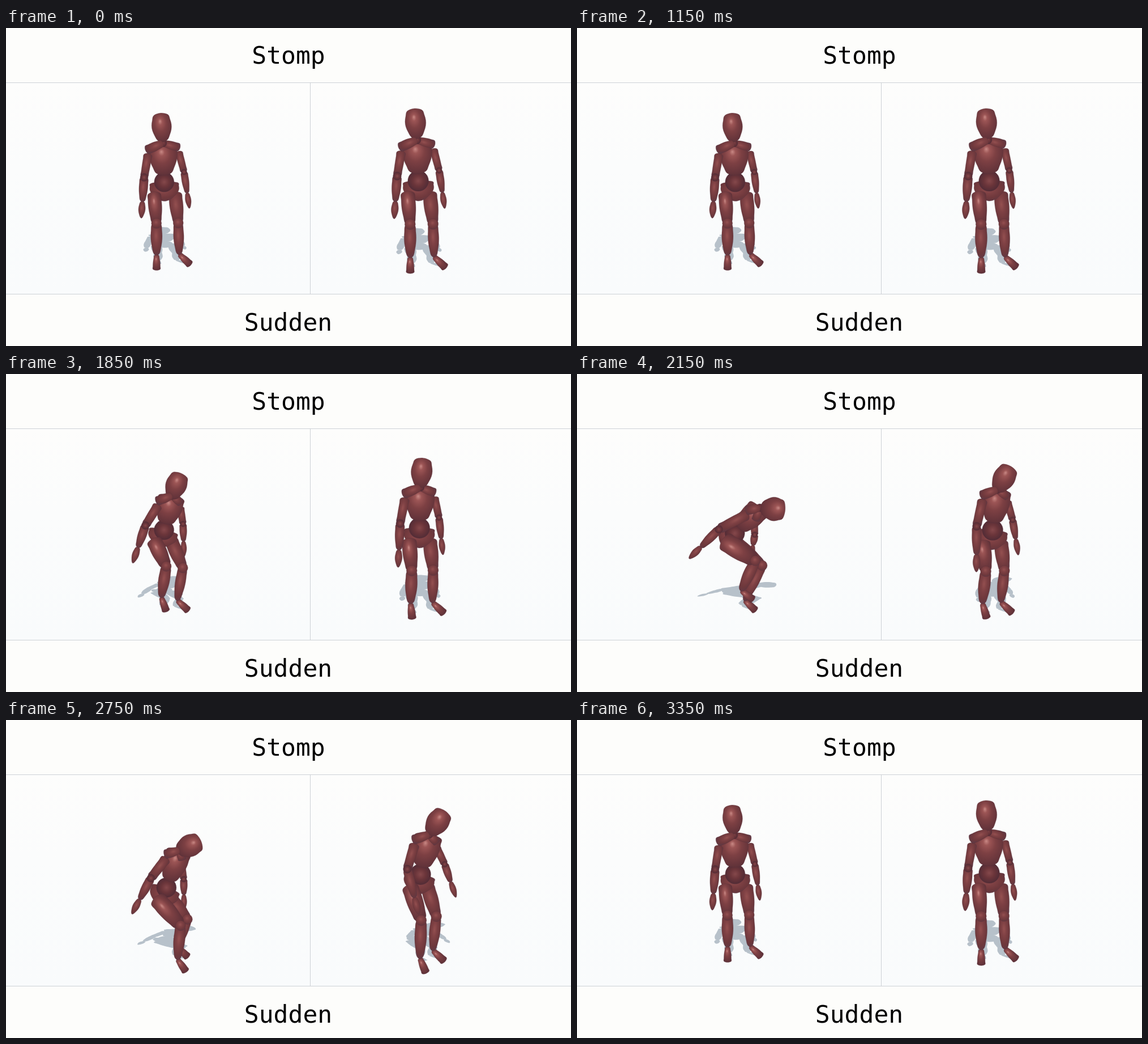
These frames come from a looping animation (998 px wide and 561 px high, 3400 ms). An HTML page:

```html
<!DOCTYPE html>
<html lang="en">
<head>
<meta charset="utf-8">
<title>Stomp, sudden</title>
<style>
html, body { margin: 0; width: 100%; height: 100%; overflow: hidden; background: #fdfdfb; }
svg { display: block; width: 100vw; height: 100vh; }
text { font: 43px "DejaVu Sans Mono", monospace; text-anchor: middle; fill: #000; }
.part { stroke: #56303a; stroke-width: .5; stroke-opacity: .6; vector-effect: non-scaling-stroke; }
</style>
</head>
<body>
<svg id="stage" viewBox="0 0 998 561">
  <defs>
    <linearGradient id="floor" x1="0" y1="0" x2="0" y2="1">
      <stop offset="0" stop-color="#fdfdfc"/>
      <stop offset=".4" stop-color="#fbfcfc"/>
      <stop offset="1" stop-color="#f9fbfc"/>
    </linearGradient>
    <radialGradient id="skin" cx=".4" cy=".54" r=".62">
      <stop offset="0" stop-color="#945050"/>
      <stop offset=".35" stop-color="#7f4144"/>
      <stop offset=".75" stop-color="#6e383c"/>
      <stop offset="1" stop-color="#623842"/>
    </radialGradient>
    <radialGradient id="gloss" cx=".4" cy=".54" r=".6" fx=".28" fy=".56">
      <stop offset="0" stop-color="#c98985"/>
      <stop offset=".18" stop-color="#9c5555"/>
      <stop offset=".5" stop-color="#7d4043"/>
      <stop offset="1" stop-color="#603239"/>
    </radialGradient>
    <radialGradient id="shade" cx=".5" cy=".5" r=".55">
      <stop offset="0" stop-color="#85484b"/>
      <stop offset=".45" stop-color="#6b353a"/>
      <stop offset="1" stop-color="#4d2a35"/>
    </radialGradient>
  </defs>
  <rect width="998" height="561" fill="#fdfdfb"/>
  <rect y="96" width="998" height="374" fill="url(#floor)"/>
  <path d="M0 96.5H998M0 469.5H998M537.5 96V470" stroke="#cdd1d6" fill="none"/>
  <text x="499" y="63">Stomp</text>
  <text x="498.5" y="534">Sudden</text>
</svg>
<script>
const stage = document.getElementById('stage');
const LOOP = 3400, STEP = 50;

// Key points; elbows, knees, shoulders and hips follow from them.
const stand = {
  head: [275, 175.5], neck: [277, 203], hip: [280, 290],
  handL: [241, 306], handR: [320, 291], footL: [266, 400], footR: [306, 399],
  elbow: [-2], knee: [2], turn: [0]
};
const crouch = {
  head: [346, 238], neck: [323, 236], hip: [267, 293],
  handL: [219, 305], handR: [311, 302], footL: [290, 382], footR: [296, 399],
  elbow: [-10], knee: [41], turn: [1]
};
const landed = {
  head: [345.5, 244], neck: [320, 242], hip: [276, 324],
  handL: [234, 321], handR: [318, 316], footL: [320, 432], footR: [300, 400],
  elbow: [-5], knee: [35], turn: [.95]
};
const lean = {
  head: [303.5, 191], neck: [293, 209], hip: [283, 295],
  handL: [258, 318], handR: [324, 292], footL: [268, 400], footR: [299, 398],
  elbow: [-5], knee: [6], turn: [.3]
};
const lunge = {
  head: [328, 193], neck: [307, 209], hip: [279, 293],
  handL: [288, 316], handR: [347, 285], footL: [290, 422], footR: [303, 403],
  elbow: [-17], knee: [15], turn: [.6]
};

const mix = (a, b, k) => a + (b - a) * k;
const mixPt = (a, b, k) => a.map((v, i) => mix(v, b[i], k));
const move = ([x, y], dx, dy) => [x + dx, y + dy];

// far arm drifts in behind the body
const idle = drift => ({ ...stand, handR: move(stand.handR, -drift, 0) });

const timeline = (windup, land) => [
  [0, stand], [750, stand], [1500, idle(5)], [1650, idle(5)],
  [2150, windup], [2500, land], [2600, land],
  [3000, idle(14)], [3050, idle(14)], [LOOP, stand]
];

function poseAt(keys, t) {
  const i = keys.findIndex(k => k[0] > t);
  const [t0, a] = keys[i - 1], [t1, b] = keys[i];
  const k = (t - t0) / (t1 - t0), ease = k * k * (3 - 2 * k);
  return Object.fromEntries(Object.keys(a).map(n => [n, mixPt(a[n], b[n], ease)]));
}

// point beyond b on the line from a
function extend(a, b, len) {
  const k = len / Math.hypot(b[0] - a[0], b[1] - a[1]);
  return move(b, (b[0] - a[0]) * k, (b[1] - a[1]) * k);
}

function bend(a, b, dx) {
  return move(mixPt(a, b, .5), dx, -Math.abs(dx) * .2);
}

function solve(p) {
  const turn = p.turn[0], spread = 18.5 * (1 - turn / 2);
  const headLen = 24.5 - 3.5 * turn, swing = turn * .9;
  const j = {
    neck: p.neck, wrL: p.handL, wrR: p.handR, anL: p.footL, anR: p.footR,
    crown: extend(p.neck, p.head, headLen),
    chin: extend(p.neck, p.head, -headLen),
    waist: mixPt(p.neck, p.hip, .64),
    belly: mixPt(p.neck, p.hip, .79),
    crotch: mixPt(p.neck, p.hip, 1.17),
    shL: move(p.neck, -26 + 5 * turn, 19 - 8 * turn),
    shR: move(p.neck, 28 - 38 * turn, 15 + 15 * turn),
    hiL: move(p.hip, -spread, 0),
    hiR: move(p.hip, spread, 0),
    toL: move(p.footL, 28 * Math.sin(swing), 27 * Math.cos(swing)),
    toR: move(p.footR, 20, 19)
  };
  j.padL = move(j.shL, -4, -6);
  j.padR = move(j.shR, 2, -7);
  j.elL = bend(j.shL, j.wrL, p.elbow[0]);
  j.elR = bend(j.shR, j.wrR, 2);
  j.knL = bend(j.hiL, j.anL, p.knee[0]);
  j.knR = bend(j.hiR, j.anR, p.knee[0]);
  j.fiL = extend(j.elL, j.wrL, 29);
  j.fiR = extend(j.elR, j.wrR, 27);
  const sizes = {
    head: 17.5 + 3.5 * turn, chest: 28 - 5 * turn,
    arm: 8 + 2 * turn, thigh: 12.5 + 5 * turn
  };
  return { j, sizes };
}

// closed curve through points
function smooth(pts) {
  const n = pts.length, at = i => pts[(i + n) % n], f = v => v.toFixed(3);
  let d = 'M' + pts[0].map(f);
  for (let i = 0; i < n; i++) {
    const [a, b, c, e] = [at(i - 1), at(i), at(i + 1), at(i + 2)];
    d += 'C' + b.map((v, q) => f(v + (c[q] - a[q]) / 6)) +
      ' ' + c.map((v, q) => f(v - (e[q] - b[q]) / 6)) + ' ' + c.map(f);
  }
  return d + 'Z';
}

// outline along a unit axis: end half-widths and a swelling between them
function tube(from, to, swell) {
  const side = Array.from({ length: 6 }, (_, i) => {
    const x = .05 + i * .18;
    return [x, mix(from, to, x) + swell * Math.sin(Math.PI * x)];
  });
  return smooth([[-.02, 0], ...side.map(([x, w]) => [x, -w]), [1.02, 0], ...side.reverse()]);
}

const shapes = {
  head: tube(.65, .42, .46),
  chest: tube(.8, .42, .25),
  pad: tube(.6, .8, .2),
  pelvis: tube(.85, .25, .38),
  thigh: tube(.85, .6, .22),
  shin: tube(.75, .45, .35),
  upper: tube(.9, .8, .05),
  fore: tube(.85, .5, .28),
  foot: tube(.5, .85, .15),
  hand: tube(.5, .25, .55)
};

// back to front: shape, from, to, half-width or size name, fill; a ball has one joint
const parts = [
  ['hand', 'wrR', 'fiR', 5.5],
  ['fore', 'elR', 'wrR', 6.5],
  ['upper', 'shR', 'elR', 7],
  ['ball', 'elR', '', 5, 'shade'],
  ['foot', 'anR', 'toR', 7.5, 'gloss'],
  ['shin', 'knR', 'anR', 9.5],
  ['thigh', 'hiR', 'knR', 12.5],
  ['ball', 'knR', '', 9],
  ['pelvis', 'belly', 'crotch', 26.5],
  ['ball', 'belly', '', 17.5, 'shade'],
  ['foot', 'anL', 'toL', 7.5, 'gloss'],
  ['shin', 'knL', 'anL', 10.5],
  ['thigh', 'hiL', 'knL', 'thigh', 'gloss'],
  ['ball', 'knL', '', 9],
  ['chest', 'neck', 'waist', 'chest', 'gloss'],
  ['pad', 'neck', 'padR', 8],
  ['ball', 'neck', '', 7, 'shade'],
  ['head', 'crown', 'chin', 'head', 'gloss'],
  ['hand', 'wrL', 'fiL', 6.5],
  ['fore', 'elL', 'wrL', 8],
  ['upper', 'shL', 'elL', 'arm'],
  ['ball', 'elL', '', 7, 'shade'],
  ['pad', 'neck', 'padL', 9]
];

function add(parent, tag, attrs) {
  const el = document.createElementNS('http://www.w3.org/2000/svg', tag);
  for (const k in attrs) el.setAttribute(k, attrs[k]);
  parent.appendChild(el);
  return el;
}

function addPart(parent, shape, attrs) {
  return shape === 'ball'
    ? add(parent, 'circle', { r: 1, ...attrs })
    : add(parent, 'path', { d: shapes[shape], ...attrs });
}

function place([shape, from, to, size], { j, sizes }) {
  const w = sizes[size] || size, [x, y] = j[from];
  let m = [0, w, -w, 0, x, y];
  if (shape !== 'ball') {
    const dx = j[to][0] - x, dy = j[to][1] - y;
    const k = w / (Math.hypot(dx, dy) || 1);
    m = [dx, dy, -dy * k, dx * k, x, y];
  }
  return `matrix(${m.map(v => v.toFixed(3))})`;
}

function makeFigure(keys, transform) {
  const figure = add(stage, 'g', { transform });
  // the shadow is the same body flattened onto the floor
  const floor = add(figure, 'g', {
    transform: 'translate(281 413) scale(.82 .235) translate(-281 -413)', fill: '#b7c1ca'
  });
  const shadows = parts.map(([shape]) => addPart(floor, shape));
  const body = parts.map(([shape, , , , fill = 'skin']) =>
    addPart(figure, shape, { class: 'part', fill: `url(#${fill})` }));

  return t => {
    const rig = solve(poseAt(keys, t));
    parts.forEach((part, i) => {
      const m = place(part, rig);
      body[i].setAttribute('transform', m);
      shadows[i].setAttribute('transform', m);
    });
  };
}

const figures = [
  makeFigure(timeline(crouch, landed), ''),
  makeFigure(timeline(lean, lunge), 'translate(723.5 144) scale(1.05) translate(-275 -152)')
];

const start = performance.now();
function tick() {
  const now = performance.now() - start;
  const t = Math.floor((now % LOOP) / STEP) * STEP;
  figures.forEach(f => f(t));
  requestAnimationFrame(tick);
}
tick();
</script>
</body>
</html>
```
